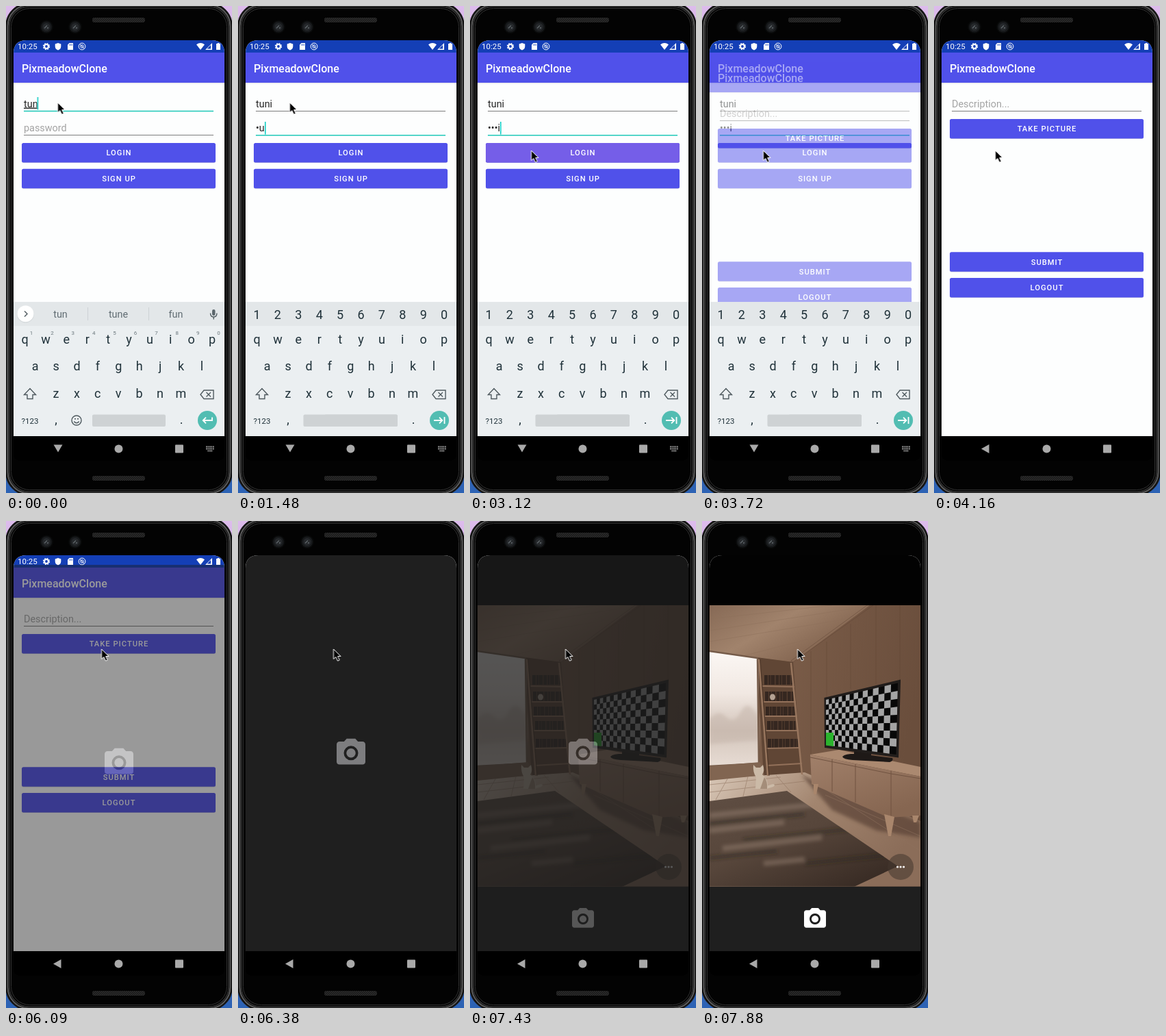
These frames come from a looping animation (330 px wide and 711 px high, 8 s). An HTML page:

```html
<!DOCTYPE html>
<html lang="en">
<head>
<meta charset="utf-8">
<title>Photo app demo</title>
<style>
html, body { margin: 0; width: 100%; height: 100%; overflow: hidden; background: #000; }
svg { display: block; width: 330px; height: 711px; font-family: Roboto, sans-serif; }
.btn rect { fill: #5051ea; }
.btn text { fill: #fff; font-size: 11.2px; font-weight: 500; letter-spacing: 1px; text-anchor: middle; }
.field { font-size: 14.4px; fill: #262626; }
.hint { fill: #a3a3a3; }
.typing { text-decoration: underline .7px #555; }
.line { stroke: #7d7d7d; }
.focus { stroke: #1fc8b8; stroke-width: 1.5; }
.key { font-size: 18px; fill: #1f3139; text-anchor: middle; }
.small { font-size: 8px; fill: #6b777d; text-anchor: middle; }
.word { font-size: 14.4px; fill: #616d73; text-anchor: middle; }
.icon { fill: none; stroke: #4f5a5f; stroke-width: 1.4; }
.white { fill: none; stroke: #fff; stroke-width: 1.8; }

.t { opacity: 0; animation: 8s step-end infinite; }
.name1 { animation-name: name1; }
.name2 { animation-name: name2; }
.name3 { animation-name: late; }
.onName { animation-name: onName; }
.onPass { animation-name: late; }
.empty { animation-name: empty; }
.pass1 { animation-name: pass1; }
.pass2 { animation-name: pass2; }
.pass3 { animation-name: pass3; }
.pass4 { animation-name: pass4; }
.words { animation-name: words; }
.digits { animation-name: digits; }
.press1 { animation-name: press1; }
.press2 { animation-name: press2; }
.navDown { animation-name: navDown; }
.navBack { animation-name: navBack; }
.home { animation-name: home; }
.camera { animation-name: camera; }
.cover { animation-name: cover; }
.keyboard { animation: keyboard 8s step-end infinite; }
.caret { animation: caret 8s step-end infinite; }
.mouse { animation: mouse 8s step-end infinite; }

@keyframes name1 { 0% { opacity: 1 } 3.7% { opacity: 0 } }
@keyframes name2 { 3.7% { opacity: 1 } 5.5% { opacity: 0 } }
@keyframes late { 5.5%, 100% { opacity: 1 } }
@keyframes onName { 0% { opacity: 1 } 5.5% { opacity: 0 } }
@keyframes empty { 0% { opacity: 1 } 14.7% { opacity: 0 } }
@keyframes pass1 { 14.7% { opacity: 1 } 18.4% { opacity: 0 } }
@keyframes pass2 { 18.4% { opacity: 1 } 20.3% { opacity: 0 } }
@keyframes pass3 { 20.3% { opacity: 1 } 24.1% { opacity: 0 } }
@keyframes pass4 { 24.1%, 100% { opacity: 1 } }
@keyframes words { 0% { opacity: 1 } 7.3% { opacity: 0 } }
@keyframes digits { 7.3%, 100% { opacity: 1 } }
@keyframes press1 { 37.1% { opacity: .5 } 38.9% { opacity: 1 } 40.8% { opacity: .6 } 42.7% { opacity: 0 } }
@keyframes press2 { 66.7% { opacity: .6 } 68.6% { opacity: 1 } 70.4% { opacity: 0 } }
@keyframes navDown { 0% { opacity: 1 } 48.3% { opacity: 0 } }
@keyframes navBack { 48.3%, 100% { opacity: 1 } }
@keyframes home {
  46.4% { opacity: .5; transform: translateY(14px) }
  48.3% { opacity: 1; transform: translateY(4px) }
  50.1% { opacity: 1; transform: translateY(1px) }
  51.9%, 100% { opacity: 1; transform: none }
}
@keyframes camera {
  76.1% { opacity: .45; transform: translateY(14px) }
  77.9% { opacity: .95; transform: translateY(4px) }
  79.7%, 100% { opacity: 1; transform: none }
}
@keyframes cover {
  0% { opacity: 1 } 92.8% { opacity: .75 } 94.7% { opacity: .4 }
  96.6% { opacity: .12 } 98.4%, 100% { opacity: 0 }
}
@keyframes keyboard {
  0% { transform: none } 48.3% { transform: translateY(110px) } 50.1%, 100% { transform: translateY(200px) }
}
@keyframes caret {
  0% { transform: translate(45.5px, 133px); opacity: 1 }
  3.7% { transform: translate(49.5px, 133px) }
  5.5% { transform: translate(26px, 169px); opacity: 1 }
  12.8% { opacity: 0 }
  14.7% { transform: translate(30.5px, 169px); opacity: 1 }
  18.4% { transform: translate(39px, 169px) }
  20.3%, 100% { transform: translate(44px, 169px) }
  31.6% { opacity: 0 } 37.1% { opacity: 1 } 42.7%, 100% { opacity: 0 }
}
@keyframes mouse {
  0% { transform: translate(75.5px, 141px) }
  29.7% { transform: translate(76px, 147px) }
  31.6% { transform: translate(79px, 166px) }
  33.4% { transform: translate(85px, 194px) }
  35.2% { transform: translate(89px, 209px) }
  37.1% { transform: translate(89.5px, 211px) }
  57.6% { transform: translate(92px, 223px) }
  59.4% { transform: translate(101px, 246px) }
  61.2% { transform: translate(114px, 258px) }
  63.1% { transform: translate(130px, 236px) }
  64.9% { transform: translate(138px, 204px) }
  66.7%, 100% { transform: translate(139.5px, 187px) }
}
</style>
</head>
<body>
<svg viewBox="0 0 330 711">
  <defs>
    <linearGradient id="desk" x2="0" y2="1"><stop stop-color="#ddbcec"/><stop offset=".5" stop-color="#8d78bd"/><stop offset="1" stop-color="#2c62b4"/></linearGradient>
    <linearGradient id="ceiling" x2="1" y2=".6"><stop stop-color="#866955"/><stop offset=".45" stop-color="#a1836c"/><stop offset="1" stop-color="#795b47"/></linearGradient>
    <linearGradient id="wall" x2="1" y2=".3"><stop stop-color="#83644f"/><stop offset="1" stop-color="#6a4e3c"/></linearGradient>
    <linearGradient id="glass" x2="0" y2="1"><stop stop-color="#fbf7f4"/><stop offset=".35" stop-color="#f1e8e2"/><stop offset=".65" stop-color="#d3c5bb"/><stop offset="1" stop-color="#eadfd7"/></linearGradient>
    <linearGradient id="floor" x2="1" y2=".5"><stop stop-color="#d9c8b8"/><stop offset=".5" stop-color="#a2856f"/><stop offset="1" stop-color="#8b6d59"/></linearGradient>
    <linearGradient id="rug" x2=".8" y2="1"><stop stop-color="#5f4e43"/><stop offset=".5" stop-color="#57463b"/><stop offset="1" stop-color="#382b24"/></linearGradient>
    <linearGradient id="cabinet" x2=".6" y2="1"><stop stop-color="#a1806a"/><stop offset="1" stop-color="#866651"/></linearGradient>
    <filter id="soft"><feGaussianBlur stdDeviation="2.500"/></filter>
    <pattern id="mesh" width="3" height="3" patternUnits="userSpaceOnUse"><path d="M0 0h3v3h-3z" fill="#2b2b2b"/><path d="M0 3 3 0" stroke="#121212"/></pattern>
    <clipPath id="screen"><path d="M11 628V69q0-19 19-19H300q19 0 19 19V628z"/></clipPath>
    <clipPath id="photo"><path d="M11 123h308v410.500h-308z"/></clipPath>
    <clipPath id="rugEdge"><path d="M11 409 124 394 286 504 222 534H11z"/></clipPath>
    <g id="cam">
      <path fill-rule="evenodd" d="M9 2 7.170 4H4c-1.100 0-2 .9-2 2v12c0 1.100.9 2 2 2h16c1.100 0 2-.9 2-2V6c0-1.100-.9-2-2-2h-3.170L15 2zM12 7a5 5 0 1 1 0 10a5 5 0 1 1 0-10z"/>
      <circle cx="12" cy="12" r="3.200"/>
    </g>
    <g id="lens">
      <circle r="10" fill="#080909"/><circle r="8" fill="#17191b"/><circle r="5.500" fill="#25282b"/>
      <path d="M-3 2 1-2M1 2 3 1" stroke="#5d6468" stroke-width="1.500"/>
    </g>
  </defs>

  <rect width="330" height="711" fill="url(#desk)"/>
  <g fill="none">
    <rect x="0" y="-4" width="330" height="718" rx="33" fill="#000" stroke="#1c1c1c" stroke-width="1.500"/>
    <rect x="2.500" y="-1.500" width="325" height="713" rx="31" stroke="#5c5c5c" stroke-width="2"/>
    <rect x="4.800" y=".8" width="320.400" height="708.400" rx="29" stroke="#2c2c2c" stroke-width="2"/>
    <rect x="7.500" y="3.500" width="315" height="703" rx="27" fill="#030303" stroke="#333"/>
  </g>
  <rect x="126" y="17" width="77" height="7" rx="3" fill="url(#mesh)"/>
  <rect x="126" y="686" width="77" height="7" rx="3" fill="url(#mesh)"/>
  <use href="#lens" x="59" y="30.500"/><use href="#lens" x="101" y="30.500"/>
  <path d="M11 628H319V653q0 11-12 11H23q-12 0-12-11z"/>

  <g fill="#a9a9a9">
    <path class="t navDown" d="M69.500 640.500h13l-6.500 11z"/>
    <path class="t navBack" d="M80.500 640v13l-11.500-6.500z"/>
    <circle cx="164.500" cy="646.500" r="6"/>
    <rect x="247" y="640.500" width="12" height="12" rx="1"/>
    <path class="t navDown" d="M292 643.500h12M292 646.500h12M294.500 649.500h7" stroke="#a0a0a0" stroke-width="1.800" stroke-dasharray="1.700 .8"/>
  </g>

  <g clip-path="url(#screen)">
    <path d="M11 50h308v578h-308z" fill="#fdfefe"/>
    <path d="M11 112h308v1.500h-308z" fill="#e9e9ee"/>
    <path d="M11 68h308v44h-308z" fill="#5051ea"/>
    <text x="23" y="97" fill="#fff" font-size="16" font-weight="500">PixmeadowClone</text>

    <g class="login">
      <text class="field t name1 typing" x="26" y="147.500">tun</text>
      <text class="field t name2 typing" x="26" y="147.500">tuni</text>
      <text class="field t name3" x="26" y="147.500">tuni</text>
      <path class="line" d="M26 153.500H303M26 188.500H303"/>
      <path class="focus t onName" d="M26 153.500H303"/>
      <path class="focus t onPass" d="M26 188.700H303"/>
      <text class="field hint t empty" x="26" y="183">password</text>
      <text class="field t pass1" x="26" y="183">t</text>
      <text class="field t pass2" x="26" y="183">•u</text>
      <text class="field t pass3" x="26" y="183">••n</text>
      <text class="field t pass4" x="26" y="183">•••i</text>
      <rect class="caret" width="1.700" height="18.500" fill="#1fd0c8"/>
      <g class="btn" data-y="200" data-press="press1">LOGIN</g>
      <g class="btn" data-y="237.700">SIGN UP</g>
    </g>

    <g class="t home">
      <path d="M11 112h308v516h-308z" fill="#fdfefe"/>
      <path d="M11 112h308v1.500h-308z" fill="#e9e9ee"/>
      <path d="M11 68h308v44h-308z" fill="#5051ea"/>
      <text x="23" y="97" fill="#fff" font-size="16" font-weight="500">PixmeadowClone</text>
      <text class="field hint" x="26" y="147.500">Description...</text>
      <path class="line" d="M26 153.500H303"/>
      <g class="btn" data-y="165" data-press="press2">TAKE PICTURE</g>
      <g class="btn" data-y="359.300">SUBMIT</g>
      <g class="btn" data-y="397">LOGOUT</g>
    </g>

    <g class="status" fill="#fff">
      <path d="M11 50h308v18h-308z" fill="#143fb6"/>
      <text x="17" y="63" font-size="11.500">10:25</text>
      <circle cx="59" cy="59" r="2.900" fill="none" stroke="#fff" stroke-width="2"/>
      <circle cx="59" cy="59" r="4.400" fill="none" stroke="#fff" stroke-width="1.500" stroke-dasharray="2 1.456"/>
      <path d="M76 54l4.300 1.600v3.400q0 4-4.300 5.500q-4.300-1.500-4.300-5.500v-3.400z"/>
      <path d="M92.500 54h5.500v10h-8v-7.500z"/><path d="M92.800 55.500v2.300M94.600 55.500v2.300M96.400 55.500v2.300" stroke="#143fb6" stroke-width=".8"/>
      <g fill="none" stroke="#fff"><circle cx="111" cy="59" r="4.900"/><circle cx="111" cy="59" r="2.200"/><path d="M108 56l6 6"/></g>
      <path d="M278 56.200q6-4.400 12 0l-6 7.800zM301 54v10h-10z"/>
      <path d="M299 57v5.500h-5.500z" fill="#143fb6"/>
      <path d="M307 55h1.700v-1h2.600v1h1.700v9h-6z"/>
    </g>

    <g class="keyboard">
      <path d="M11 432h308v196h-308z" fill="#ebeff1"/>
      <path d="M11 432h308v35h-308z" fill="#e3e7e9"/>
      <g id="letters"></g>
      <text x="35" y="609.500" class="key" style="font-size:11.500px">?123</text>
      <text x="73" y="610" class="key">,</text><text x="256" y="610" class="key">.</text>
      <path class="icon" d="M35 558.500l8.500 9h-4.500v6h-8v-6h-4.500zM289 561h14v12.500h-14l-5-6.250zM292.500 564l6.500 6.500M299 564l-6.500 6.500"/>
      <rect x="126" y="596.500" width="107" height="17.500" rx="2" fill="#ced2d4"/>
      <circle cx="294" cy="605" r="14" fill="#52bdb2"/>
      <g class="t words">
        <circle cx="28.500" cy="450" r="12.500" fill="#d3d8da"/><circle cx="28.500" cy="449.300" r="12" fill="#fff"/>
        <path class="icon" d="M27 445.500l4 4-4 4"/>
        <path d="M119.500 440v19M208.500 440v19" stroke="#cdd2d5"/>
        <g class="t name1"><text class="word" x="79.500" y="455">tun</text><text class="word" x="164" y="455">tune</text><text class="word" x="248" y="455">fun</text></g>
        <g class="t name2"><text class="word" x="79.500" y="455">tuni</text><text class="word" x="164" y="455">tunic</text><text class="word" x="248" y="455">tuning</text></g>
        <rect x="301" y="443" width="4.500" height="9" rx="2.200" fill="#5b666c"/>
        <path class="icon" d="M298.500 448.500q0 5.500 4.700 5.500t4.700-5.500M303.200 454v3.500"/>
        <g id="hints"></g>
        <circle class="icon" cx="103" cy="605" r="7"/>
        <path class="icon" d="M99.300 606.500q3.700 4.500 7.400 0M100 602.700h2M104 602.700h2"/>
        <path class="white" d="M301 600.500v4.500h-13M292 600.700l-4.300 4.300 4.300 4.300"/>
      </g>
      <g class="t digits">
        <g id="digits"></g>
        <rect x="95.500" y="596.500" width="137.500" height="17.500" rx="2" fill="#ced2d4"/>
        <path class="white" d="M286 605h12M294 600.700l4.300 4.300-4.300 4.300M301.500 600v10"/>
      </g>
    </g>

    <g class="t camera">
      <path d="M11 50h308v578h-308z" fill="#020202"/>
      <path d="M11 533h308v95h-308z" fill="#1f1f1f"/>
      <g clip-path="url(#photo)">
        <path d="M11 123h308v411h-308z" fill="url(#wall)"/>
        <path d="M11 123H245L133 206 82 200 11 190z" fill="url(#ceiling)"/>
        <path d="M11 143 190 123M11 160 220 128M11 176 212 143M60 197 180 166" stroke="#8d705b" stroke-width=".8" opacity=".6"/>
        <path d="M133 206 250 123h-9L130 204zM159 190v150M182 176v155M217 150v95M254 123v116M289 123v109" fill="none" stroke="#5d4333" opacity=".45"/>
        <path d="M80 199 133 206 146 372 90 374z" fill="#604635"/>
        <path d="M11 190 82 200 84 356 11 366z" fill="url(#glass)"/>
        <path d="M11 290q12-16 24-4t22-8 25 8v34L11 326z" fill="#c2b2a7" opacity=".5" filter="url(#soft)"/>
        <path d="M11 190 81 200 83 354 11 358" fill="none" stroke="#755b49" stroke-width="2.500"/>
        <path d="M11 377 150 367 319 438V534H11z" fill="url(#floor)"/>
        <path d="M145 371 319 440V462L255 452 190 422z" fill="#553e31" opacity=".65" filter="url(#soft)"/>
        <path d="M11 385 115 374M11 396 150 380M38 375 20 407M67 373 60 402M108 371 130 396M145 369 319 482M180 400 319 460M205 450 319 510" stroke="#8e725e" opacity=".55"/>
        <path d="M11 358 85 352 91 371 11 379z" fill="#816551"/>
        <g clip-path="url(#rugEdge)">
          <path d="M11 394h276v140H11z" fill="url(#rug)"/>
          <g filter="url(#soft)">
            <path d="M11 430 165 414M11 452 120 440M30 478 175 462M90 500 150 494" stroke="#a08b7a" stroke-width="8" opacity=".4"/>
            <path d="M11 442 150 428M60 466 215 450M11 492 110 482M150 500 270 488" stroke="#2c221c" stroke-width="6" opacity=".4"/>
          </g>
        </g>
        <path d="M91 232h41M92 256h42M93 278h43M95 299h42M96 325h44" stroke="#352720" stroke-width="14" stroke-dasharray="5 .8 3 .6 6 1"/>
        <path d="M88 241 135 242M90 264 137 264M91 285 139 285M93 306 141 306M94 332 143 331M95 357 146 354" stroke="#93715a" stroke-width="2"/>
        <path d="M83 202 96 372M130 207 146 370" stroke="#98765e" stroke-width="2.500"/>
        <path d="M85 202 98 372" stroke="#4b3527"/>
        <ellipse cx="103" cy="257" rx="4" ry="4.500" fill="#b5a393"/>
        <path d="M75 356l4 4h6l4-4q3 9-1 14 8 7 8 16l8-2q4 1 0 4l-10 3H78l1-17q-5-7-4-18z" fill="#cbbaa7"/>
        <path d="M91 374q5 6 4 17H85" fill="#a48d79"/>
        <path d="M158 341 200 334 319 359V373z" fill="#ab8970"/>
        <path d="M158 341 319 373V430L273 433 160 384z" fill="url(#cabinet)"/>
        <path d="M190 348v47M224 355v56M276 365v67M158 345 276 369 319 376" fill="none" stroke="#705341"/>
        <path d="M163 384h7l-3 15h-4zM266 428 281 432 276 460h-4zM307 430h10l-4 10h-4z" fill="#a9866c"/>
        <path d="M205 344q5-5 25-4l48 6q2 4-4 6l-54-3q-14-1-15-5zM222 336h25v9h-25z" fill="#1e1917"/>
        <path d="M178.500 258 290 231.500 287 345.500 179 331z" fill="#211d1b"/>
        <path d="M181 261 286 236.500 283.500 341 181 327z" fill="#080808"/>
        <path id="checks" fill="#a4a4a4"/>
        <path d="M181 309h11v20l-11-1.500z" fill="#2bb32d"/>
        <circle cx="290" cy="505" r="19" fill="#44372f" opacity=".55"/>
        <path d="M285.500 505h0M290 505h0M294.500 505h0" stroke="#fff" stroke-width="3.200" stroke-linecap="round"/>
      </g>
      <use href="#cam" fill="#fff" transform="translate(145.800 561.800) scale(1.600)"/>
      <g class="t cover">
        <path d="M11 50h308v578h-308z" fill="#1f1f1f"/>
        <use href="#cam" fill="#7d7d7f" transform="translate(139.800 313.600) scale(2.100)"/>
      </g>
    </g>
  </g>

  <path class="mouse" d="M0 0V14.500L3.400 11.500 6 17.300 8.700 16 6.200 10.500H10.500z" stroke="#fff" stroke-width="1"/>
</svg>
<script>
const $ = id => document.getElementById(id);

const row = (chars, x, y, cls = 'key') =>
  [...chars].map((c, i) => `<text class="${cls}" x="${x + i * 30.4}" y="${y}">${c}</text>`).join('');

$('letters').innerHTML = row('qwertyuiop', 27.5, 493) + row('asdfghjkl', 42.7, 532) + row('zxcvbnm', 73, 572);
$('hints').innerHTML = row('1234567890', 37, 480, 'small');
$('digits').innerHTML = row('1234567890', 27.5, 457);

for (const b of document.querySelectorAll('.btn')) {
  const { y, press } = b.dataset, label = b.textContent;
  const box = (dy, style) => `<rect x="23" y="${+y + dy}" width="283" height="28.500" rx="2.500" ${style}/>`;
  b.innerHTML = box(.6, 'style="fill:#c9c9dc"') + box(0, '') +
    (press ? box(0, `class="t ${press}" style="fill:#755ee8"`) : '') +
    `<text x="165" y="${+y + 18.3}">${label}</text>`;
}

// Perspective checkerboard on the television
const cols = 16, rows = 9;
const spot = (c, r) => {
  const u = c / cols, v = r / rows;
  const s = u * 66 / ((1 - u) * 104.5 + u * 66);
  const top = 261 - 24.5 * s, low = 327 + 14 * s;
  return [181 + (105 - 2.5 * v) * s, top + (low - top) * v].map(n => n.toFixed(1)).join(' ');
};
let d = '';
for (let c = 0; c < cols; c++)
  for (let r = c % 2; r < rows; r += 2)
    d += `M${spot(c, r)}L${spot(c + 1, r)} ${spot(c + 1, r + 1)} ${spot(c, r + 1)}z`;
$('checks').setAttribute('d', d);
</script>
</body>
</html>
```
